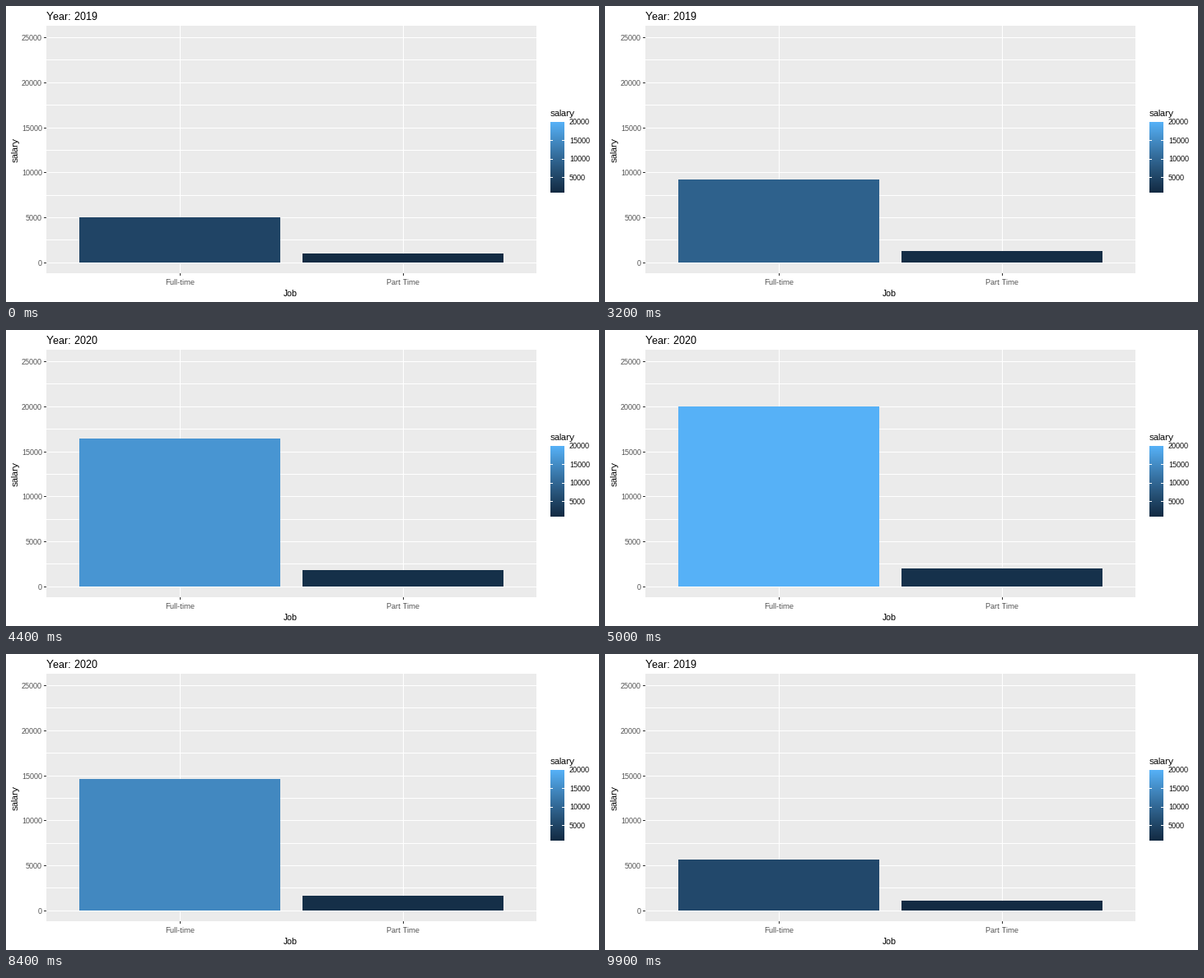
Write a matplotlib script that moves like this. It is 720 px wide and 360 px high and loops after 10 s.

```python
import math

import matplotlib.pyplot as plt
import numpy as np
from matplotlib.animation import FuncAnimation
from matplotlib.patches import Rectangle

plt.rcParams.update({
    "font.family": "Liberation Sans",
    "text.hinting": "default",
    "text.hinting_factor": 1,
    "toolbar": "None",
})

W, H, DPI = 720, 360, 72      # at 72 dpi one point is one pixel
FRAMES, STEP = 100, 100
LEFT, TOP, RIGHT, BOTTOM = 49, 24, 644, 325
ZERO, UNIT = 312.1, 54.7 / 5000
SALARY = {"Full-time": (5000, 20000), "Part Time": (1000, 2000)}
BARS = {"Full-time": (89, 333), "Part Time": (360, 604)}
TICKS_X = {"Full-time": 211, "Part Time": 482}

RGB_XYZ = np.array([[0.4124, 0.3576, 0.1805],
                    [0.2126, 0.7152, 0.0722],
                    [0.0193, 0.1192, 0.9505]])
WHITE = RGB_XYZ.sum(axis=1)


def to_lab(code):
    c = np.array([int(code[i:i + 2], 16) for i in (1, 3, 5)]) / 255
    lin = np.where(c > 0.04045, ((c + 0.055) / 1.055) ** 2.4, c / 12.92)
    r = RGB_XYZ @ lin / WHITE
    f = np.where(r > 0.008856, np.cbrt(r), 7.787 * r + 16 / 116)
    return np.array([116 * f[1] - 16, 500 * (f[0] - f[1]), 200 * (f[1] - f[2])])


def to_rgb(lab):
    fy = (lab[0] + 16) / 116
    f = np.array([fy + lab[1] / 500, fy, fy - lab[2] / 200])
    r = np.where(f > 0.20689, f ** 3, (f - 16 / 116) / 7.787)
    lin = np.clip(np.linalg.solve(RGB_XYZ, r * WHITE), 0, 1)
    return np.where(lin > 0.0031308, 1.055 * lin ** (1 / 2.4) - 0.055, 12.92 * lin)


LOW, HIGH = to_lab("#132B43"), to_lab("#56B1F7")


def shade(value):
    u = min(max((value - 1000) / 19000, 0), 1)
    return to_rgb(LOW + (HIGH - LOW) * u)


def row(value):
    return math.floor(ZERO - value * UNIT)


fig = plt.figure(figsize=(W / DPI, H / DPI), dpi=DPI, facecolor="white")
ax = fig.add_axes([0, 0, 1, 1])


def box(x0, y0, x1, y1, color, z=1):
    patch = Rectangle((x0, y0), x1 - x0, y1 - y0, facecolor=color,
                      linewidth=0, antialiased=False, zorder=z)
    return ax.add_patch(patch)


def label(x, y, s, size, color="black", ha="left", **kw):
    return ax.text(x, y, s, fontsize=size, color=color, ha=ha,
                   va="baseline", **kw)


# Panel, grid and axes
box(LEFT, TOP, RIGHT, BOTTOM, "#EBEBEB")
for value in range(0, 25001, 2500):
    y = row(value)
    box(LEFT, y, RIGHT, y + 1, "white", 2)
    if value % 5000 == 0:
        box(LEFT - 3, y, LEFT, y + 1, "#333333", 2)
        label(44, y + 4, str(value), 9, "#4D4D4D", "right")
for name, x in TICKS_X.items():
    box(x, TOP, x + 1, BOTTOM, "white", 2)
    box(x, BOTTOM, x + 1, BOTTOM + 3, "#333333", 2)
    label(x + 0.5, 339, name, 9, "#4D4D4D", "center")
label(345.5, 353, "Job", 11, ha="center")
label(15, 175, "salary", 11, ha="center", rotation=90, rotation_mode="anchor")
title = label(49, 17, "", 13)

# Colour legend
label(661, 134, "salary", 11)
ramp = [[shade(v)] for v in np.linspace(20000, 1000, 86)]
ax.imshow(ramp, extent=(661, 678, 227, 141), aspect="auto",
          interpolation="nearest", zorder=1)
for value in range(5000, 20001, 5000):
    y = 141 + (20000 - value) * 86 / 19000
    label(684, round(y) + 3, str(value), 9)
    if value < 20000:
        y = math.floor(y)
        box(661, y, 664, y + 1, "white", 2)
        box(675, y, 678, y + 1, "white", 2)

bars = {name: box(x0, ZERO, x1, ZERO, "white", 3)
        for name, (x0, x1) in BARS.items()}

ax.set_xlim(0, W)
ax.set_ylim(H, 0)
ax.axis("off")


def update(i):
    # hold, 25 steps up, hold, 25 steps down
    k = min(max(i - 25, 0), 25, FRAMES - i)
    for name, bar in bars.items():
        a, b = SALARY[name]
        value = a + (b - a) * k / 25
        top = row(value)
        bar.set_y(top)
        bar.set_height(row(0) - top)
        bar.set_facecolor(shade(value))
    title.set_text("Year: 2020" if k >= 13 else "Year: 2019")
    return [*bars.values(), title]


anim = FuncAnimation(fig, update, frames=FRAMES, interval=STEP,
                     repeat=True, repeat_delay=0, blit=False)
plt.show()
```
